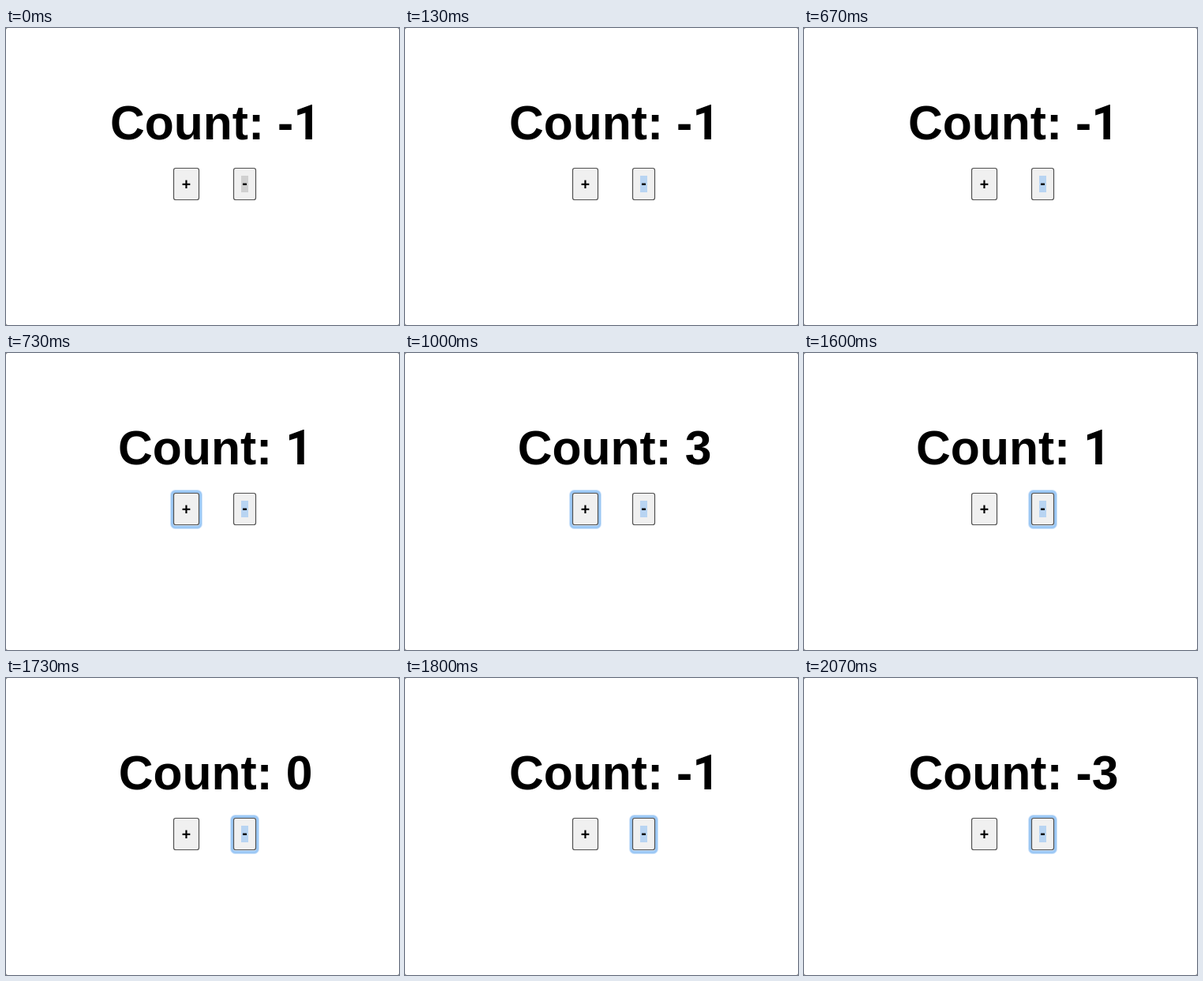
An HTML page that plays this animation: 498 by 376 pixels, repeating every 3070 ms.

```html
<!DOCTYPE html>
<html lang="en">
<head>
<meta charset="utf-8">
<style>
  html, body { margin: 0; width: 100%; height: 100%; overflow: hidden; background: #fff; }
  svg { display: block; width: 498px; height: 376px; }
  text { font-family: "Liberation Sans", Arial, sans-serif; font-weight: bold; text-anchor: middle; }
  #count { font-size: 60.6px; }
  .footless { font-family: Roboto, sans-serif; }
  .label { font-size: 19.5px; }
  .button { fill: #f0f0f0; stroke: #505050; stroke-width: 1.2; }
  .ring { fill: none; }
  .ring rect { stroke: #9cc8f5; stroke-width: 3; }
  .ring .glow { stroke: #cfe4fa; stroke-width: 5; }
</style>
</head>
<body>
<svg viewBox="0 0 498 376">
  <rect width="498" height="376" fill="#777"/>
  <rect width="498" height="376" rx="2.5" fill="#fff"/>
  <text id="count" x="265.5" y="141"></text>

  <g id="plusRing" class="ring">
    <rect class="glow" x="210.5" y="175.5" width="36" height="45" rx="4"/>
    <rect x="210.5" y="175.5" width="36" height="45" rx="4"/>
  </g>
  <rect class="button" x="212.5" y="177.5" width="32" height="40" rx="2.5"/>
  <text class="label" x="228.5" y="204.8">+</text>

  <g id="minusRing" class="ring">
    <rect class="glow" x="286.5" y="175.5" width="32" height="45" rx="4"/>
    <rect x="286.5" y="175.5" width="32" height="45" rx="4"/>
  </g>
  <rect class="button" x="288.5" y="177.5" width="28" height="40" rx="2.5"/>
  <rect id="selection" x="298" y="187" width="9" height="21"/>
  <text class="label" x="302.4" y="203.4">-</text>
</svg>
<script>
  const LOOP = 3070;
  const SELECTED_AT = 70, PLUS_FOCUS_AT = 730, MINUS_FOCUS_AT = 1400;
  // [time in ms, counter value]
  const clicks = [
    [0, -1], [730, 1], [870, 2], [1000, 3],
    [1470, 2], [1600, 1], [1730, 0], [1800, -1], [1930, -2], [2070, -3]
  ];
  const byId = id => document.getElementById(id);
  const show = (id, visible) =>
    byId(id).setAttribute("visibility", visible ? "visible" : "hidden");

  function draw(now) {
    const t = now % LOOP;
    const value = clicks.filter(([time]) => time <= t).pop()[1];
    // The main font's "1" has a foot; borrow a plain one.
    byId("count").innerHTML = `Count: ${value}`.replace("1", '<tspan class="footless">1</tspan>');
    byId("selection").setAttribute("fill", t < SELECTED_AT ? "#d0d0d0" : "#b8d4f2");
    show("plusRing", t >= PLUS_FOCUS_AT && t < MINUS_FOCUS_AT);
    show("minusRing", t >= MINUS_FOCUS_AT);
  }

  const start = performance.now();
  function tick() {
    draw(performance.now() - start);
    requestAnimationFrame(tick);
  }
  tick();
</script>
</body>
</html>
```
